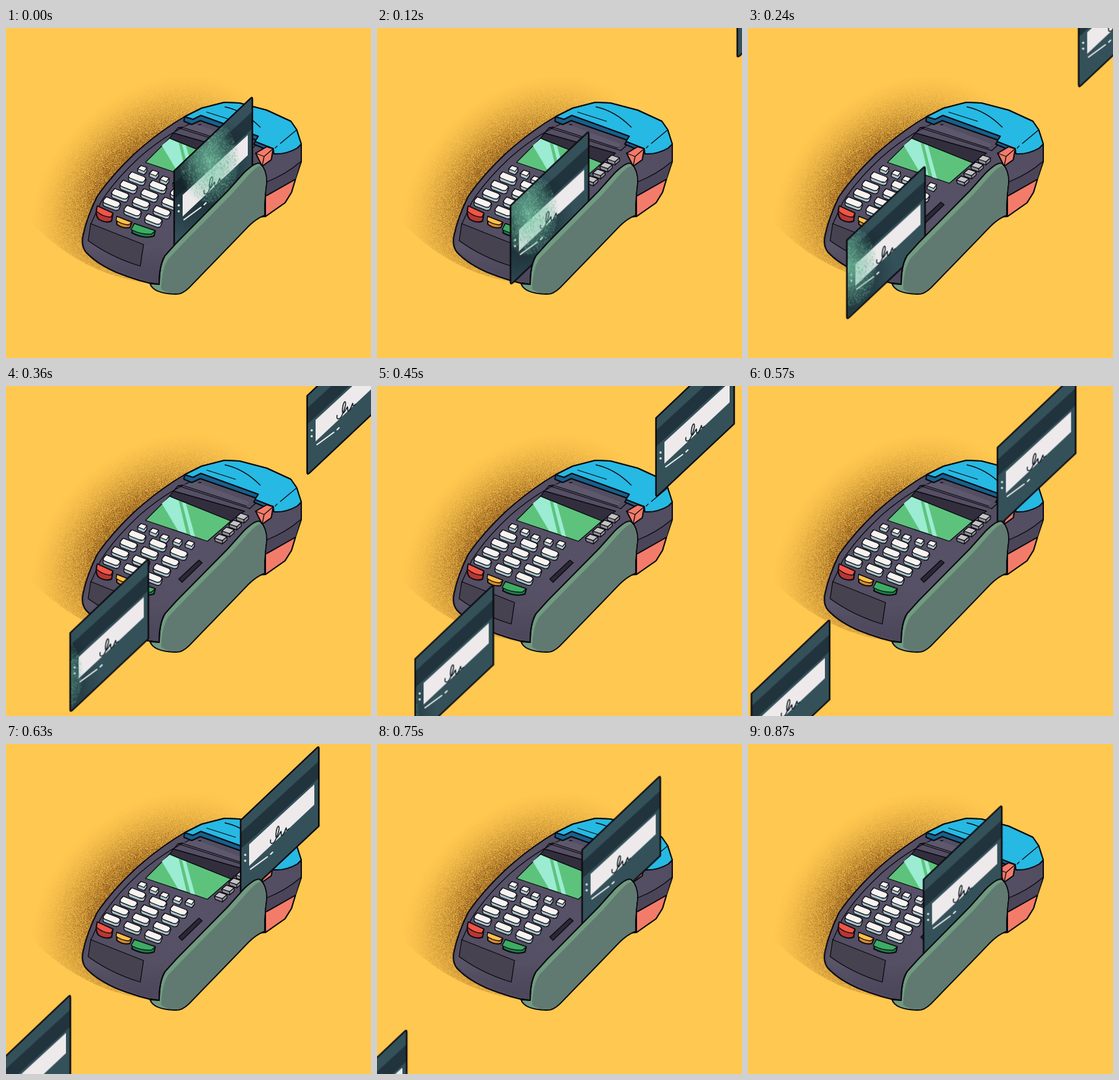
An HTML page with a canvas for the animation above (0.9 s loop, 560x506 px).

```html
<!DOCTYPE html>
<html lang="en">
<head>
<meta charset="utf-8">
<title>Card swipe</title>
<style>
  html, body { margin: 0; width: 100%; height: 100%; overflow: hidden; background: #ffc850; }
  canvas, svg { position: absolute; left: 0; top: 0; width: 560px; height: 506px; }
  .ink { stroke: #0b0a10; stroke-width: 2; stroke-linejoin: round; stroke-linecap: round; }
  .thin { stroke: #0b0a10; stroke-width: 1.3; stroke-linejoin: round; stroke-linecap: round; }
  .line { fill: none; }
  .move, .fix { animation: slide 900ms steps(30) infinite; }
  .in { --a: 340; --b: 0; }
  .in .fix { --a: -340; --b: 0; }
  .out { --a: 0; --b: -399; }
  .out .fix { --a: 0; --b: 399; }
  @keyframes slide {
    from { transform: translate(calc(var(--a) * 1px), calc(var(--a) * -1px)); }
    to { transform: translate(calc(var(--b) * 1px), calc(var(--b) * -1px)); }
  }
</style>
</head>
<body>
<canvas id="shade" width="560" height="506"></canvas>
<svg viewBox="0 0 560 506">
  <defs>
    <linearGradient id="shell" x1="0" y1="1" x2=".8" y2="0">
      <stop offset="0" stop-color="#504b5e"/>
      <stop offset=".5" stop-color="#575267"/>
      <stop offset="1" stop-color="#514c60"/>
    </linearGradient>
    <linearGradient id="front" x1="0" y1="0" x2=".3" y2="1">
      <stop offset="0" stop-color="#6b657b" stop-opacity="0"/>
      <stop offset=".35" stop-color="#6b657b" stop-opacity=".35"/>
      <stop offset="1" stop-color="#353041" stop-opacity=".2"/>
    </linearGradient>
    <radialGradient id="dark">
      <stop offset="0" stop-color="#0c161c" stop-opacity=".65"/>
      <stop offset=".5" stop-color="#0c161c" stop-opacity=".42"/>
      <stop offset="1" stop-color="#0c161c" stop-opacity="0"/>
    </radialGradient>
    <radialGradient id="light">
      <stop offset="0" stop-color="#84d3b0" stop-opacity=".75"/>
      <stop offset=".45" stop-color="#74c4a4" stop-opacity=".5"/>
      <stop offset="1" stop-color="#64ad96" stop-opacity="0"/>
    </radialGradient>
    <clipPath id="face"><path d="M259 218L377 108V229L259 338Z"/></clipPath>

    <g id="key">
      <path class="thin" fill="#a9c3c8" d="M-9-9L12-1Q15 1 13 5L11 10Q9 12 5 11L-11 5Q-14 3-13-1Z"/>
      <path class="thin" fill="#f6f3f1" d="M-8-9.500L11-2Q14 0 13 2L10 6Q8 7 4 6L-11 0Q-14-2-12-5Z" stroke-width=".8"/>
    </g>
    <g id="nub">
      <path class="thin" fill="#a9c3c8" d="M-7-1L-2-6L7-3V3L3 8L-7 4Z"/>
      <path class="thin" fill="#f6f3f1" d="M-7-1L-2-6L7-3L3 3Z"/>
    </g>
    <g id="cube">
      <path class="thin" fill="#8f8f95" d="M-10-1L-3-7L9-3V2L2 8L-9 4Z"/>
      <path class="thin" fill="#c3c2c4" d="M-10-1L-3-7L9-3L2 3Z"/>
      <path class="thin line" d="M2 3V8"/>
    </g>

    <g id="plate">
      <path fill="#34515a" d="M258 219L375 108Q378 105 378 109V228L262 337Q258 341 258 336Z"/>
      <path fill="#21343d" d="M258 238L378 128V154L258 263Z"/>
    </g>
    <g id="print">
      <path fill="#eeeaeb" d="M271 256L371 164V195L271 289Z"/>
      <path class="line" stroke="#17242b" stroke-width="1.600" stroke-linecap="round"
        d="M304 249C302 256 308 256 311 250C315 242 319 229 316 228C313 229 311 243 313 246C315 246 318 238 320 236C321 238 319 244 322 242C325 240 327 232 328 230C328 234 328 236 332 232"/>
      <g fill="#eeeaeb"><circle cx="265" cy="272" r="1.700"/><circle cx="265" cy="281" r="1.700"/></g>
      <path class="line" stroke="#eeeaeb" stroke-width="2" stroke-linecap="round" d="M273 294L299 275M304 271L307 268"/>
    </g>
    <path id="rim" class="ink line" style="stroke-width:2.400" d="M258 219L375 108Q378 105 378 109V228L262 337Q258 341 258 336Z"/>

    <!-- light and dark stay in place while the card passes -->
    <ellipse id="dim" cx="322" cy="202" rx="92" ry="100" fill="url(#dark)"/>
    <g id="glow">
      <ellipse cx="338" cy="178" rx="48" ry="68" fill="url(#light)"/>
      <g id="grain"/>
    </g>
    <g id="card">
      <use href="#plate"/>
      <g clip-path="url(#face)"><use href="#dim" class="fix"/></g>
      <use href="#print"/>
      <g clip-path="url(#face)"><use href="#glow" class="fix"/></g>
      <use href="#rim"/>
    </g>
  </defs>

  <!-- terminal -->
  <path class="ink" fill="url(#shell)" d="M274 136L300 123L335 114L358 115L400 126L437 143L446 156L453 178V205L444 232L438 252L428 268L398 289L385 290L290 370L234 394Q205 389 170 375Q138 361 122 343Q115 333 118 319Q124 290 140 258Q162 226 198 192Q236 158 274 136Z"/>
  <path fill="#4a4558" d="M400 236Q430 224 452 205L444 232L398 258Z"/>
  <path class="thin line" d="M400 236Q430 224 452 205"/>
  <path class="ink" fill="#f27c69" d="M398 258L444 232L438 252L428 268L398 289Z"/>
  <path fill="url(#front)" d="M131 300L216 334L244 332L234 392Q160 374 122 340Q116 325 131 300Z"/>
  <path class="thin line" d="M284 146Q243 165 205 198Q165 235 145 268L130 301M299 148L264 153L257 161M374 188L385 178"/>
  <path fill="#5e586d" d="M270 152L291 147L374 178L369 184Z"/>
  <path class="thin line" d="M264 153L374 188M270 152L369 184"/>

  <!-- screen -->
  <path class="thin" fill="#332e3e" d="M257 161L366 192L345 207L251 169Z"/>
  <path class="thin" fill="#5dc37c" d="M251 169L345 207L309 238L214 206Z"/>
  <path fill="#9becd2" d="M239 180L251 170L265 176L277 226L264 222ZM270 178L276 180L290 231L283 229Z"/>

  <g id="keys"></g>
  <path class="ink" fill="#b93632" d="M140 273L164 284L162 296Q153 300 142 293Q136 286 140 273Z"/>
  <path class="thin" fill="#ef5546" d="M140 273L164 284L161 290Q149 290 139 281Z"/>
  <path class="ink" fill="#d88b2c" d="M170 289L193 298L190 306Q179 308 170 301Z"/>
  <path class="thin" fill="#ffc04a" d="M170 289L193 298L188 302Q177 301 169 295Z"/>
  <path class="ink" fill="#237b49" d="M197 300L229 311L227 319Q212 324 193 314Z"/>
  <path class="thin" fill="#3cac63" d="M197 300L229 311L223 316Q207 317 192 309Z"/>
  <path class="thin" fill="#2b2735" d="M265 296L296 267L301 271L270 301Z"/>
  <path class="thin" fill="#47424f" d="M130 300L211 332L206 365Q162 352 126 326Z"/>

  <!-- paper cover -->
  <path class="ink" fill="#17608c" d="M274 136L287 138L299 133L386 164L411 182L410 191L380 178L384 172L298 142L285 148L273 143Z"/>
  <path class="ink" fill="#26b9e3" d="M274 136L300 123L335 114L358 115L400 126L437 143L446 156L453 178L447 184Q430 194 411 193L410 185L382 174L387 166L299 134L287 140Z"/>
  <path class="thin line" d="M308 129L352 143M336 121Q365 127 390 152M445 157L421 177M416 181L413 184"/>

  <!-- side button -->
  <path class="ink" fill="#f27c69" d="M383 192L400 182L410 185L407 202L393 212Z"/>
  <path class="thin line" d="M383 192L396 197L410 185M396 197L393 212"/>

  <g class="move in"><use href="#card"/></g>
  <g class="move out"><use href="#card"/></g>

  <!-- side panel in front of the cards -->
  <path class="ink" fill="#719b80" d="M221 392L235 393Q235 364 244 349L262 329L340 250L365 222Q384 204 390 208Q400 217 400 236Q396 266 397 287Q384 292 372 304L345 332L281 398Q270 409 259 408Q226 407 221 392Z"/>
  <path fill="#617a71" d="M238 400Q239 369 249 354L268 334L346 255L370 228Q386 210 391 212Q399 220 399 236Q395 266 396 286Q384 291 371 303L344 331L280 397Q270 408 259 407Q245 406 238 400Z"/>
  <path class="ink line" d="M222 391L235 393Q235 364 244 349"/>
</svg>
<script>
  const byId = id => document.getElementById(id);
  let seed = 7;
  const rand = () => (seed = (seed * 16807) % 2147483647) / 2147483647;

  const put = (id, x, y) => `<use href="#${id}" x="${x}" y="${y}"/>`;
  let keys = "";
  for (let row = 0; row < 4; row++) {
    for (let col = 0; col < 3; col++) keys += put("key", 201 + 32 * col - 13 * row, 230 + 13 * col + 12.8 * row);
    keys += put("cube", 363 - 11 * row, 202 + 10.7 * row);
  }
  for (const [x, y] of [[209, 217], [227, 224], [243, 233], [263, 239], [282, 243]]) keys += put("nub", x, y);
  byId("keys").innerHTML = keys;

  // Grainy ground shadow: a tilted ellipse, denser toward its middle
  const ctx = byId("shade").getContext("2d");
  ctx.beginPath();
  ctx.moveTo(40, 300);
  ctx.quadraticCurveTo(125, 385, 235, 393);
  ctx.lineTo(420, 200);
  ctx.lineTo(420, 60);
  ctx.lineTo(40, 60);
  ctx.clip();
  ctx.fillStyle = "#7d4a14";
  for (let y = 75; y < 396; y++) {
    for (let x = 35; x < 400; x++) {
      const dx = x - 225, dy = y - 250;
      const r = Math.hypot((dx * 0.766 - dy * 0.643) / 205, (dx * 0.643 + dy * 0.766) / 150);
      const p = Math.max(0, 1.03 - r) / 0.5;
      ctx.globalAlpha = Math.min(0.8, 0.85 * p ** 1.6 * (0.25 + 0.75 * rand()));
      ctx.fillRect(x, y, 1, 1);
    }
  }

  // Grain of the light falling on the card
  const grain = ["#b4f3d8", "#5dbb97", "#3d8371"].map(color => {
    let d = "";
    for (let i = 0; i < 700; i++) {
      const r = rand() ** 0.7, a = rand() * 2 * Math.PI;
      d += `M${Math.round(338 + 44 * r * Math.cos(a))} ${Math.round(178 + 62 * r * Math.sin(a))}h1`;
    }
    return `<path d="${d}" stroke="${color}" stroke-opacity=".6" fill="none"/>`;
  });
  byId("grain").innerHTML = grain.join("");
</script>
</body>
</html>
```
